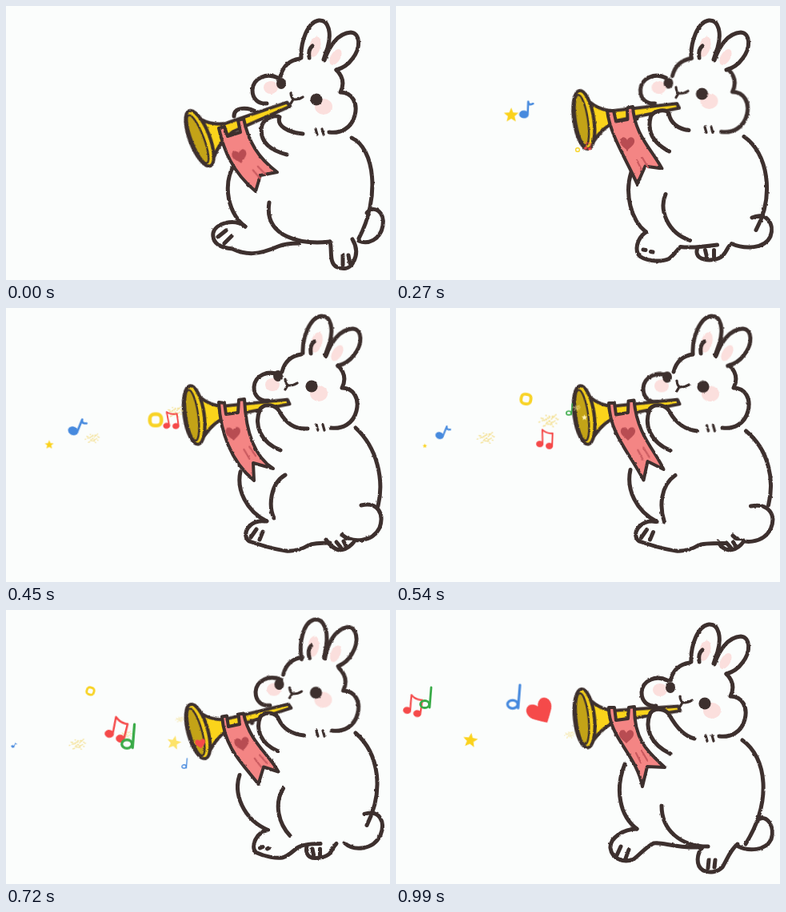
Recreate the animation shown at these times as an HTML page without scripts. Size 480 by 343 pixels, loop 1080 ms.

```html
<!DOCTYPE html>
<html lang="en">
<head>
<meta charset="utf-8">
<title>Trumpet bunny</title>
<style>
html,body{margin:0;width:100%;height:100%;overflow:hidden;background:#fbfdfc}
svg{display:block;width:100%;height:100%}
.ink{fill:none;stroke:#3d302e;stroke-width:5;stroke-linecap:round;stroke-linejoin:round}
.white{fill:#fbfdfc}
.solid{fill:#3d302e;stroke:none}
.blush{fill:#fbdfdd;stroke:none}
.line{fill:none;stroke-width:2.8;stroke-linecap:round;stroke-linejoin:round}
.red{fill:#f54a4a;stroke:#f54a4a}
.blue{fill:#478ade;stroke:#478ade}
.green{stroke:#3aab48}
.gold{fill:#fbd21c}
.dust{fill:none;stroke:#f4e196;stroke-width:1.6;stroke-dasharray:1.2 3.5}

/* Poses are held for 90 ms; steps(2) adds one in-between pose */
[id^="m-"]{animation:1.08s steps(2) infinite}
#m-tail{animation-name:tail}
#m-body{animation-name:body}
#m-footL{animation-name:footL}
#m-footR{animation-name:footR}
#m-arm{animation-name:arm}
#m-flag{animation-name:flag}
#m-crest{animation-name:crest}
#m-horn{animation-name:horn}
#m-paw{animation-name:paw}
#m-ears{animation-name:ears;transform-origin:385px 66px}
#m-head{animation-name:head}
#m-cheek{animation-name:cheek}
#m-eyeL{animation-name:eyeL}
#m-eyeR{animation-name:eyeR}
#m-mouth{animation-name:mouth}
#m-chest{animation-name:chest}
#m-star1{animation-name:star1}
#m-star2{animation-name:star2}
#m-note{animation-name:note}
#m-ring{animation-name:ring}
#m-pair{animation-name:pair}
#m-green{animation-name:green}
#m-blue{animation-name:blue}
#m-heart{animation-name:heart}
#m-dust1{animation-name:dust1}
#m-dust2{animation-name:dust2}
#m-dust3{animation-name:dust3}

@keyframes tail{
0%,100%{d:path("M451 259C460 248 474 258 471 275C468 293 452 299 441 294")}
16.66%{d:path("M450 262C462 255 474 270 470 285C464 302 440 304 420 298")}
33.33%,41.65%{d:path("M440 268C462 258 474 275 466 292C458 306 432 306 419 297")}
41.66%{d:path("M444 247C465 242 473 258 467 275C458 294 432 294 420 284")}
58.33%{d:path("M443 249C467 245 478 260 470 277C460 297 432 299 422 286")}
74.99%{d:path("M453 262C466 254 472 270 466 287C458 304 438 306 424 297")}
91.66%,99.99%{d:path("M452 263C464 254 474 272 469 287C462 302 440 302 428 296")}
}
/* left side, right side, belly or thigh */
@keyframes body{
0%,100%{d:path("M290 194C270 212 274 258 299 276M432 165C461 178 468 240 441 291M329 246C322 290 370 299 405 295")}
16.66%{d:path("M286 190C275 220 283 258 303 276M430 162C462 180 472 240 434 297M332 245C332 270 350 292 385 296")}
33.33%,41.65%{d:path("M302 226C296 250 304 278 322 290M440 165C468 188 475 235 466 264M342 226C325 240 328 275 350 291")}
41.66%{d:path("M293 205C288 227 300 254 326 267M437 150C464 175 473 215 465 248M349 209C330 220 328 248 335 263")}
58.33%{d:path("M293 200C287 227 300 254 326 268M438 158C468 180 474 215 466 246M349 210C331 224 330 250 336 273")}
74.99%{d:path("M291 213C281 232 292 270 329 283M436 150C466 180 471 240 436 293M344 237C338 262 352 285 374 292")}
91.66%,99.99%{d:path("M286 193C273 225 280 258 301 274M433 163C464 185 470 240 437 293M332 245C332 275 355 296 390 296")}
}
@keyframes footL{
0%,100%{d:path("M299 276C285 265 262 272 259 284C257 298 270 303 283 304C300 312 315 312 340 301C350 297 360 297 366 297M265 289L275 281M273 297L282 288")}
16.66%{d:path("M303 276C292 288 284 305 288 314C295 322 310 321 316 315C322 309 326 300 330 293C340 297 355 299 385 295M297 304L296 314M306 305L306 315")}
33.33%,41.65%{d:path("M322 290C310 294 311 308 322 313C335 318 355 320 366 318C372 316 376 312 381 310C386 308 400 306 418 303M321 306L328 297M331 310L336 301")}
41.66%{d:path("M324 267C304 264 293 284 304 292C322 298 340 303 350 304C362 305 370 302 378 297C385 294 395 294 405 294M306 287L313 277M317 290L321 280")}
58.33%{d:path("M325 268C304 264 293 284 304 292C322 298 340 303 350 304C362 305 370 302 378 297C385 294 400 295 420 295M307 288L314 278M318 290L322 281")}
74.99%{d:path("M329 283C322 292 317 308 321 315C328 321 337 319 341 316C342 312 344 305 348 300C352 294 360 290 366 290M328 308L328 315M335 308L335 315")}
91.66%,99.99%{d:path("M301 274C285 274 267 285 268 298C270 312 285 317 297 312C305 306 312 297 322 292C335 290 345 298 380 297M281 296L276 307M291 300L287 311")}
}
@keyframes footR{
0%,100%{d:path("M405 295C408 305 403 322 414 327C422 330 430 329 434 321C439 312 439 302 433 292M421 312L421 324M428 312L430 322")}
16.66%{d:path("M372 296C362 302 355 312 366 317C375 322 392 322 400 317C407 310 410 302 415 298M376 305L375 315M388 306L386 316")}
33.33%,41.65%{d:path("M385 303C386 312 395 318 404 317C410 316 414 313 416 309C418 307 418 305 418 303M397 306L402 313M407 305L409 312")}
41.66%{d:path("M400 290C404 296 409 301 416 303C424 303 429 299 432 296C434 294 435 293 436 291M413 293L418 299M422 292L425 298")}
58.33%{d:path("M404 294C406 299 411 303 416 303C422 303 427 300 430 297C432 295 433 293 434 291M413 295L418 300M421 294L425 299")}
74.99%{d:path("M350 290C343 300 338 312 348 317C356 320 372 319 379 313C384 306 386 298 392 294M353 303L351 313M364 304L360 314")}
91.66%,99.99%{d:path("M383 297C376 305 374 320 384 326C392 330 402 328 408 322C414 312 418 300 427 293M391 313L390 323M399 313L398 322")}
}
@keyframes arm{
0%,100%{d:path("M351 186C328 180 316 168 320 149C324 139 338 136 342 139C338 150 352 158 371 160")}
16.66%{d:path("M332 179C318 165 310 148 317 127C324 120 338 122 340 130C346 142 352 150 364 156")}
33.33%,41.65%{d:path("M351 185C328 180 316 168 320 149C324 139 338 136 342 139C340 150 352 158 368 155")}
41.66%{d:path("M343 178C318 168 309 146 318 126C324 119 338 121 342 130C350 144 360 152 377 151")}
58.33%{d:path("M343 179C318 168 309 146 317 126C324 119 338 121 342 130C350 144 360 152 376 157")}
74.99%{d:path("M336 174C318 166 314 152 319 141C326 133 338 136 340 144C342 152 350 158 369 157")}
91.66%,99.99%{d:path("M343 180C318 168 310 148 318 129C324 121 338 124 342 132C350 146 360 158 373 161")}
}
@keyframes flag{
0%,100%{d:path("M266 153C272 180 283 208 312 232L318 212L339 208C315 190 303 170 297 141L290 143L293 158L277 163L273 151Z")}
16.66%{d:path("M262 112C262 140 290 170 290 214L303 190L326 199C318 165 296 150 298 112L289 112L288 126L274 126L272 112Z")}
33.33%,41.65%{d:path("M266 151C274 185 285 212 313 232L320 211L339 208C318 190 300 170 294 140L289 143L291 158L276 163L272 150Z")}
41.66%{d:path("M266 118C268 155 281 192 310 216L309 194L334 201C312 187 300 160 298 114L291 115L290 131L275 133L273 119Z")}
58.33%{d:path("M266 120C267 160 299 165 309 215L320 190L335 203C337 170 303 160 297 117L290 118L290 131L275 134L273 119Z")}
74.99%{d:path("M274 147C280 185 288 215 322 221L324 203L346 202C320 190 305 170 297 142L291 143L294 155L281 158L279 146Z")}
91.66%,99.99%{d:path("M266 122C266 160 300 180 308 221L314 196L336 197C318 180 297 165 298 121L291 122L290 136L275 138L273 122Z")}
}
@keyframes crest{
0%,100%{transform:translate(292px,188px) rotate(-14deg)}
16.66%{transform:translate(286px,157px) rotate(14deg)}
33.33%,41.65%{transform:translate(292px,187px) rotate(-14deg)}
41.66%{transform:translate(284px,157px) rotate(-4deg)}
58.33%{transform:translate(296px,157px) rotate(2deg)}
74.99%{transform:translate(294px,178px) rotate(-24deg)}
91.66%,99.99%{transform:translate(288px,158px) rotate(0deg)}
}
@keyframes horn{
0%,100%{transform:translate(356px,122px) rotate(-21deg) scale(1)}
16.66%{transform:translate(356px,127px) rotate(4deg) scale(1)}
33.33%,41.65%{transform:translate(355px,122px) rotate(-21deg) scale(1)}
41.66%,58.33%{transform:translate(356px,117px) rotate(-8deg) scale(1)}
74.99%{transform:translate(359px,122px) rotate(-23deg) scale(1,.9)}
91.66%,99.99%{transform:translate(357px,123px) rotate(-6deg) scale(1)}
}
@keyframes paw{
0%,33.33%,41.65%,100%{transform:none}
16.66%,41.66%,58.33%,91.66%,99.99%{transform:translate(32px,6px)}
74.99%{transform:translate(13px,1px)}
}
@keyframes ears{
0%,16.66%,33.33%,41.65%,91.66%,100%{transform:translate(0,0) rotate(0deg)}
41.66%,58.33%{transform:translate(2px,-8px) rotate(1deg)}
74.99%{transform:translate(-1px,-3px) rotate(-17deg)}
}
@keyframes head{
0%,91.66%,100%{transform:none}
16.66%{transform:translate(1px,0)}
33.33%,41.65%{transform:translate(4px,-1px)}
41.66%{transform:translate(2px,-8px)}
58.33%{transform:translate(6px,-8px)}
74.99%{transform:translate(1px,-6px)}
}
@keyframes cheek{
0%,16.66%,100%{transform:none}
33.33%,41.65%{transform:translate(-5px,0)}
41.66%{transform:translate(2px,-6px)}
58.33%{transform:translate(0,-3px)}
74.99%{transform:translate(8px,-2px)}
91.66%,99.99%{transform:translate(-1px,-2px)}
}
@keyframes eyeL{
0%,100%{transform:none}
16.66%{transform:translate(-3px,1px)}
33.33%,41.65%{transform:translate(-4px,-2px)}
41.66%{transform:translate(-4px,-12px)}
58.33%{transform:translate(-6px,-9px)}
74.99%{transform:translate(1px,1px)}
91.66%,99.99%{transform:translate(-1px,0)}
}
@keyframes eyeR{
0%,100%{transform:none}
16.66%{transform:translate(-3px,-4px)}
33.33%,41.65%{transform:translate(-8px,-10px)}
41.66%{transform:translate(-6px,-19px)}
58.33%{transform:translate(-2px,-18px)}
74.99%{transform:translate(1px,-9px)}
91.66%,99.99%{transform:translate(-2px,0)}
}
@keyframes mouth{
0%,100%{transform:translate(362px,115px)}
16.66%{transform:translate(358px,111px)}
33.33%,41.65%{transform:translate(354px,104px)}
41.66%{transform:translate(355px,95px)}
58.33%{transform:translate(359px,99px)}
74.99%{transform:translate(362px,107px)}
91.66%,99.99%{transform:translate(361px,114px)}
}
@keyframes chest{
0%,33.33%,41.65%,74.99%,100%{transform:none}
16.66%{transform:translate(-2px,-5px)}
41.66%{transform:translate(1px,-8px)}
58.33%{transform:translate(2px,-6px)}
91.66%,99.99%{transform:translate(0,3px)}
}

/* Things blown out of the bell */
@keyframes star1{
0%,100%{transform:translate(240px,118px) scale(0)}
16.66%{transform:translate(181px,111px) scale(1)}
33.33%,41.65%{transform:translate(107px,162px) scale(1.3)}
41.66%{transform:translate(54px,171px) scale(.7)}
58.33%,99.99%{transform:translate(18px,174px) scale(0)}
}
@keyframes note{
0%,100%{transform:translate(245px,140px) rotate(0deg) scale(0)}
16.66%{transform:translate(193px,132px) rotate(4deg) scale(.95)}
33.33%,41.65%{transform:translate(132px,126px) rotate(4deg) scale(1.15)}
41.66%{transform:translate(89px,148px) rotate(24deg) scale(1.15)}
58.33%{transform:translate(28px,162px) rotate(24deg) scale(.7)}
74.99%,99.99%{transform:translate(-8px,176px) rotate(24deg) scale(0)}
}
@keyframes ring{
0%,16.66%,100%{transform:translate(245px,180px) rotate(0deg) scale(0)}
33.33%,41.65%{transform:translate(209px,180px) rotate(0deg) scale(1)}
41.66%{transform:translate(187px,140px) rotate(0deg) scale(1.6)}
58.33%{transform:translate(138px,88px) rotate(18deg) scale(1.1)}
74.99%{transform:translate(73px,115px) rotate(18deg) scale(.9)}
91.66%,99.99%{transform:translate(20px,120px) rotate(18deg) scale(0)}
}
@keyframes pair{
0%,16.66%,100%{transform:translate(245px,172px) rotate(0deg) scale(0)}
33.33%,41.65%{transform:translate(234px,178px) rotate(0deg) scale(.85)}
41.66%{transform:translate(206px,140px) rotate(-8deg) scale(.95)}
58.33%{transform:translate(167px,187px) rotate(12deg) scale(1.05)}
74.99%{transform:translate(111px,110px) rotate(16deg) scale(1.45)}
91.66%,99.99%{transform:translate(22px,119px) rotate(8deg) scale(1.1)}
}
@keyframes green{
0%,41.66%,100%{transform:translate(240px,138px) scale(0)}
58.33%{transform:translate(194px,117px) scale(1.1)}
74.99%{transform:translate(113px,202px) scale(1.25)}
91.66%,99.99%{transform:translate(38px,111px) scale(1)}
}
@keyframes star2{
0%,41.66%,100%{transform:translate(240px,136px) rotate(0deg) scale(0);fill:#fff3b8}
58.33%{transform:translate(231px,138px) rotate(0deg) scale(.9);fill:#fff3b8}
74.99%{transform:translate(189px,194px) rotate(24deg) scale(1.3);fill:#fbd21c}
91.66%,99.99%{transform:translate(93px,163px) rotate(8deg) scale(1.15);fill:#fbd21c}
}
@keyframes blue{
0%,58.33%,100%{transform:translate(245px,175px) scale(0)}
74.99%{transform:translate(202px,210px) scale(.95)}
91.66%,99.99%{transform:translate(148px,110px) scale(1.15)}
}
@keyframes heart{
0%,58.33%,100%{transform:translate(248px,165px) rotate(0deg) scale(0)}
74.99%{transform:translate(238px,169px) rotate(-20deg) scale(1.4)}
91.66%,99.99%{transform:translate(181px,127px) rotate(-30deg) scale(1.8)}
}
@keyframes dust1{
0%,33.33%,41.65%,100%{transform:translate(150px,160px) scale(0)}
41.66%{transform:translate(108px,163px) scale(.7)}
58.33%{transform:translate(117px,162px) scale(1)}
74.99%{transform:translate(62px,174px) scale(.6)}
91.66%,99.99%{transform:translate(30px,174px) scale(0)}
}
@keyframes dust2{
0%,33.33%,41.65%,100%{transform:translate(235px,140px) scale(0)}
41.66%{transform:translate(211px,130px) scale(.8)}
58.33%{transform:translate(171px,152px) scale(1.1)}
74.99%,99.99%{transform:translate(130px,160px) scale(0)}
}
@keyframes dust3{
0%,41.66%,100%{transform:translate(232px,126px) scale(0)}
58.33%{transform:translate(219px,124px) scale(.8)}
74.99%{transform:translate(215px,150px) scale(0)}
91.66%,99.99%{transform:translate(217px,156px) scale(.5)}
}
</style>
</head>
<body>
<svg viewBox="0 0 480 343">
<defs>
  <filter id="rough" filterUnits="userSpaceOnUse" x="0" y="0" width="480" height="343" color-interpolation-filters="sRGB">
    <feTurbulence type="fractalNoise" baseFrequency=".25" numOctaves="2" seed="4" result="n"/>
    <feDisplacementMap in="SourceGraphic" in2="n" scale="2.2" xChannelSelector="R" yChannelSelector="G"/>
  </filter>
  <path id="star" d="M0-8L2.2-2.8L8-2.4L3.6 1.3L5 7L0 4L-5 7L-3.6 1.3L-8-2.4L-2.2-2.8Z"/>
  <path id="love" d="M0 9C-5 4-10 1-9-4C-8-9-2-9 0-4C2-9 8-9 9-4C10 1 5 4 0 9Z"/>
  <g id="half"><ellipse cx="-2" cy="7" rx="5.5" ry="4.5"/><path d="M4 11L6-14"/></g>
  <path id="dust" d="M-13 2L10-8L-8 8L13-2L-4-7L6 8L-11-4L11 4"/>
</defs>

<g class="ink" filter="url(#rough)">
  <path id="m-tail"/>
  <path id="m-footR" class="white"/>
  <path id="m-footL" class="white"/>
  <path id="m-body"/>

  <g id="m-ears">
    <path class="white" d="M369 65C368 45 377 20 391 18C404 17 407 35 402 52L397 67"/>
    <path class="white" d="M398 68C404 50 415 34 431 33C443 34 444 52 433 66C428 73 420 78 413 80"/>
    <ellipse class="blush" cx="386" cy="51" rx="7" ry="13" transform="rotate(15 386 51)"/>
    <ellipse class="blush" cx="412" cy="64" rx="6" ry="11" transform="rotate(30 412 64)"/>
    <path d="M379 65C378 58 379 53 383 50"/>
  </g>
  <path id="m-head" d="M343 88C346 76 354 68 367 66M413 80C421 88 423 98 418 108C433 108 440 122 436 137C432 153 418 160 404 158"/>
  <g id="m-cheek">
    <ellipse class="blush" cx="331" cy="102" rx="9" ry="8"/>
    <path d="M340 90C326 83 309 90 308 105C308 117 316 123 326 122"/>
  </g>
  <ellipse id="m-eyeL" class="solid" cx="344" cy="97" rx="6" ry="7"/>
  <g id="m-eyeR">
    <ellipse class="blush" cx="397" cy="126" rx="11" ry="10"/>
    <circle class="solid" cx="388" cy="117" r="7.6"/>
  </g>
  <path id="m-chest" style="stroke-width:3.2" d="M387 154L389 161M395 154L397 161"/>
  <path id="m-paw" class="white" d="M285 138C285 126 302 126 314 133"/>

  <g id="m-horn" style="stroke-width:4.2">
    <path fill="#fad41b" d="M-121-35C-113-20-103-10-86-6L-4-3L-2 3L-80 7C-100 12-110 24-121 36Z"/>
    <ellipse fill="#f0cb1b" cx="-122" rx="12.5" ry="37"/>
    <ellipse fill="#c3a317" cx="-124.5" rx="7.5" ry="32" style="stroke-width:2.4"/>
  </g>
  <path id="m-mouth" style="stroke-width:3.2" d="M-6-6C-6-2-4 2-1 2C3 2 6 1 9-1M-3 2L-6 7"/>
  <path id="m-flag" fill="#f48584" style="stroke-width:4"/>
  <g id="m-crest">
    <use href="#love" fill="#b84c52" stroke="none"/>
    <path stroke="#c95a5f" style="stroke-width:2.2" d="M12 21L18 33M19 18L26 30"/>
  </g>
  <path id="m-arm" class="white"/>
</g>

<g class="line">
  <use id="m-dust1" href="#dust" class="dust"/>
  <use id="m-dust2" href="#dust" class="dust"/>
  <use id="m-dust3" href="#dust" class="dust"/>
  <use id="m-star1" href="#star" class="gold"/>
  <use id="m-star2" href="#star" class="gold"/>
  <g id="m-note" class="blue" style="stroke-width:2.4">
    <ellipse cx="-2" cy="6.5" rx="4.5" ry="3.5"/>
    <path fill="none" d="M2.5 6L2-9Q3-4 8-7"/>
  </g>
  <rect id="m-ring" x="-4.5" y="-4.5" width="9" height="9" rx="3.6" stroke="#f8d326"/>
  <g id="m-pair" class="red" style="stroke-width:2">
    <ellipse cx="-6.5" cy="7" rx="3.6" ry="3"/>
    <ellipse cx="5.5" cy="9" rx="3.6" ry="3"/>
    <path fill="none" d="M-3 7L-4-11Q2-6 9-7L9 8"/>
  </g>
  <use id="m-green" href="#half" class="green"/>
  <use id="m-blue" href="#half" stroke="#478ade"/>
  <use id="m-heart" href="#love" class="red" style="stroke:none"/>
</g>
</svg>
</body>
</html>
```
